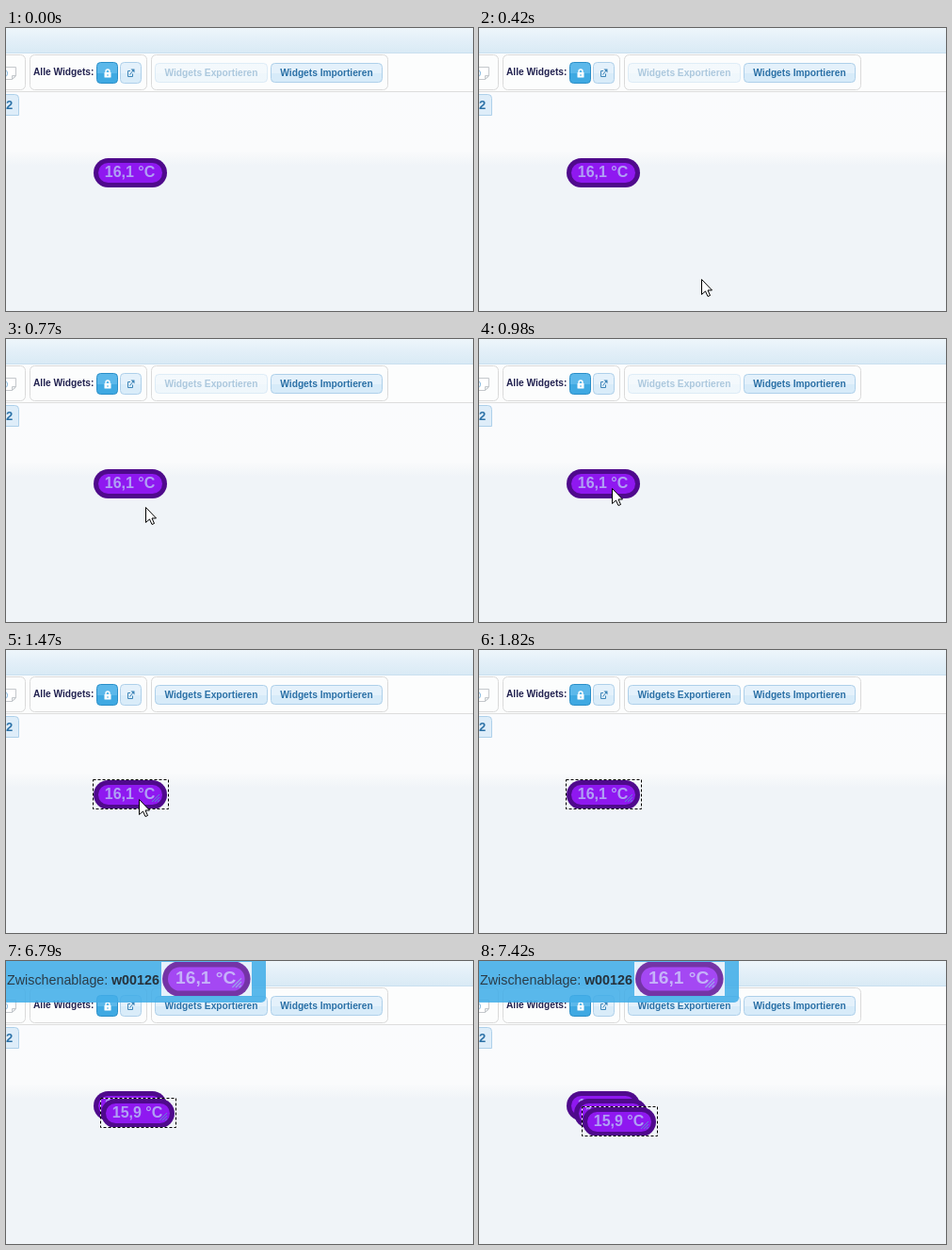
An HTML page with a canvas that plays this animation: 496x300 px, repeating every 8 s.

```html
<!DOCTYPE html>
<html lang="de">
<head>
<meta charset="utf-8">
<title>Widget editor</title>
<style>
html, body { margin: 0; width: 100%; height: 100%; overflow: hidden; background: #f0f4f8; }
canvas { display: block; width: 496px; height: 300px; }
</style>
</head>
<body>
<canvas id="stage" width="496" height="300"></canvas>
<script>
const ctx = document.getElementById('stage').getContext('2d');
const LOOP = 8000, STEP = 70;
const FONT = '"Liberation Sans", Arial, sans-serif';

function vertical(y0, y1, ...stops) {
  const g = ctx.createLinearGradient(0, y0, 0, y1);
  for (const [at, color] of stops) g.addColorStop(at, color);
  return g;
}

function box(x, y, w, h, r, fill, stroke) {
  ctx.beginPath();
  ctx.roundRect(x, y, w, h, r);
  if (fill) { ctx.fillStyle = fill; ctx.fill(); }
  if (stroke) { ctx.strokeStyle = stroke; ctx.lineWidth = 1; ctx.stroke(); }
}

function text(str, x, y, size, color, weight = 'bold', align = 'left') {
  ctx.font = `${weight} ${size}px ${FONT}`;
  ctx.textAlign = align;
  ctx.fillStyle = color;
  ctx.fillText(str, x, y);
}

function poly(points, fill, stroke) {
  ctx.beginPath();
  points.forEach(([x, y]) => ctx.lineTo(x, y));
  ctx.closePath();
  if (fill) { ctx.fillStyle = fill; ctx.fill(); }
  if (stroke) { ctx.strokeStyle = stroke; ctx.lineWidth = 1; ctx.stroke(); }
}

function glass(x, y, w, h, top, bottom, border) {
  box(x + .5, y + .5, w - 1, h - 1, 4,
    vertical(y, y + h, [0, top], [.5, top], [.52, bottom], [1, bottom]), border);
}

function button(label, x, w, enabled) {
  ctx.save();
  if (!enabled) ctx.globalAlpha = .35;
  glass(x, 37, w, 21, '#e4f1fb', '#d7ebf9', '#aed0ea');
  text(label, x + w / 2, 51, 10.2, '#2a70a6', 'bold', 'center');
  ctx.restore();
}

function noteIcon() {
  poly([[-3, 41.5], [10.5, 41.5], [10.5, 51], [6.5, 54.5], [-3, 54.5]], '#fff', '#c4c8cc');
  poly([[6.5, 54.5], [6.5, 50.5], [10.5, 50.5]], '#eceef0', '#c4c8cc');
  ctx.beginPath();
  ctx.arc(-3, 48, 4.5, -1, 1);
  ctx.strokeStyle = '#7fb4dc';
  ctx.stroke();
}

function lockIcon() {
  ctx.strokeStyle = '#fff';
  ctx.lineWidth = 1.4;
  ctx.beginPath();
  ctx.arc(108, 46, 2, Math.PI, 0);
  ctx.lineTo(110, 48);
  ctx.moveTo(106, 46);
  ctx.lineTo(106, 48);
  ctx.stroke();
  box(104.5, 47, 7, 5.5, .5, '#fff');
  ctx.fillStyle = '#48ade4';
  ctx.fillRect(107.5, 49, 1, 2);
}

function linkIcon() {
  ctx.strokeStyle = '#3f86b8';
  ctx.lineWidth = 1;
  ctx.beginPath();
  ctx.moveTo(132, 45.5);
  ctx.lineTo(129.5, 45.5);
  ctx.lineTo(129.5, 51.5);
  ctx.lineTo(134.5, 51.5);
  ctx.lineTo(134.5, 48.5);
  ctx.moveTo(131.5, 49.5);
  ctx.lineTo(135, 45);
  ctx.stroke();
  poly([[132.5, 43.5], [136.5, 43.5], [136.5, 47.5]], '#3f86b8');
}

function page(canExport) {
  ctx.fillStyle = vertical(68, 146,
    [0, '#fafbfd'], [.8, '#fafbfc'], [.88, '#f6f8fa'], [1, '#f0f4f8']);
  ctx.fillRect(0, 0, 496, 300);
  ctx.fillStyle = vertical(0, 26, [0, '#eef6fb'], [.35, '#e6f1f9'], [1, '#d9eaf5']);
  ctx.fillRect(0, 0, 496, 26);
  ctx.fillStyle = '#c9dfef';
  ctx.fillRect(0, 26, 496, 1);
  ctx.fillStyle = '#fcfdfd';
  ctx.fillRect(0, 27, 496, 40);
  ctx.fillStyle = '#dddddd';
  ctx.fillRect(0, 67, 496, 1);

  for (const [x, w] of [[-20, 40], [25, 124], [154, 251]])
    box(x + .5, 28.5, w, 37, 5, '#fcfdfd', '#dadada');

  noteIcon();
  text('Alle Widgets:', 29, 50, 10.2, '#222250');
  glass(96, 36, 23, 23, '#5cb8ea', '#3fa9e2', '#2b8fc8');
  lockIcon();
  glass(121, 36, 23, 23, '#e4f1fb', '#d9ecf9', '#aed0ea');
  linkIcon();
  button('Widgets Exportieren', 158, 120, canExport);
  button('Widgets Importieren', 281, 119, true);

  box(-9.5, 70.5, 23, 22, [4, 4, 0, 0], '#deedf9', '#aed0ea');
  text('2', 0, 86, 13, '#2a70a6');
}

function grip(x, y, color) {
  ctx.strokeStyle = color;
  ctx.lineWidth = 1;
  for (const d of [2, 5, 8]) {
    ctx.beginPath();
    ctx.moveTo(x - d, y);
    ctx.lineTo(x, y - d);
    ctx.stroke();
  }
}

const vivid = { rim: '#4f0a8c', fill: '#8f18f0', ink: '#b0a0f4', grip: '#5a8ad2' };
const pale = { rim: '#7434a6', fill: '#a448f3', ink: '#c5b2f9', grip: '#9aa4ea' };

function pill(x, y, label, look, selected) {
  box(x, y, 78, 31, 15.5, look.rim);
  box(x + 5, y + 5, 68, 21, 10.5, look.fill);
  text(label, x + 38.5, y + 20, 16, look.ink, 'bold', 'center');
  if (selected) grip(x + 70, y + 23, look.grip);
}

function selection(x, y) {
  ctx.save();
  ctx.lineWidth = 1;
  ctx.strokeStyle = '#fff';
  ctx.strokeRect(x - .5, y - .5, 80, 31);
  ctx.setLineDash([3, 2]);
  ctx.strokeStyle = '#000';
  ctx.strokeRect(x - .5, y - .5, 80, 31);
  ctx.restore();
}

function clipboard() {
  box(0, 0, 276, 44, [0, 0, 5, 0], 'rgba(66,174,232,.87)');
  text('Zwischenablage:', 1, 25, 14.3, '#2b3c48', 'normal');
  text('w00126', 112, 25, 14.3, '#26323c');
  ctx.fillStyle = '#e6f1fb';
  ctx.fillRect(165, 1, 96, 36);
  ctx.save();
  ctx.beginPath();
  ctx.rect(165, 1, 96, 36);
  ctx.clip();
  ctx.translate(166, .4);
  ctx.scale(1.2, 1.2);
  pill(0, 0, '16,1 °C', pale, true);
  ctx.restore();
}

function cursor(x, y) {
  const shape = [[0, 0], [0, 16], [4, 12.5], [6.5, 18], [9, 17], [6.5, 11.5], [11, 11.5]];
  poly(shape.map(([a, b]) => [x + a + .5, y + b + .5]), '#fff', '#000');
}

function pointer(t) {
  if (t < 350 || t >= 1820) return;
  if (t >= 1750) return cursor(164, 206);
  const step = Math.min(9, Math.floor((t - 350) / STEP));
  const left = 1 - step / 9;
  cursor(Math.round(141 + 130 * left ** 2.67), Math.round(158 + 132 * left ** 1.71));
}

function draw(t) {
  const picked = t >= 1470;
  page(picked);

  const widgets = [[93, 138, '16,1 °C']];
  if (t >= 6790) widgets.push([101, 146, '15,9 °C']);
  if (t >= 7420) widgets.push([110, 155, '15,9 °C']);
  widgets.forEach(([x, y, label], i) => {
    const active = picked && i === widgets.length - 1;
    pill(x, y, label, vivid, active);
    if (active) selection(x, y);
  });

  if (t >= 4200) clipboard();
  pointer(t);
}

const start = performance.now();
function tick() {
  draw((performance.now() - start) % LOOP);
  requestAnimationFrame(tick);
}
tick();
</script>
</body>
</html>
```
